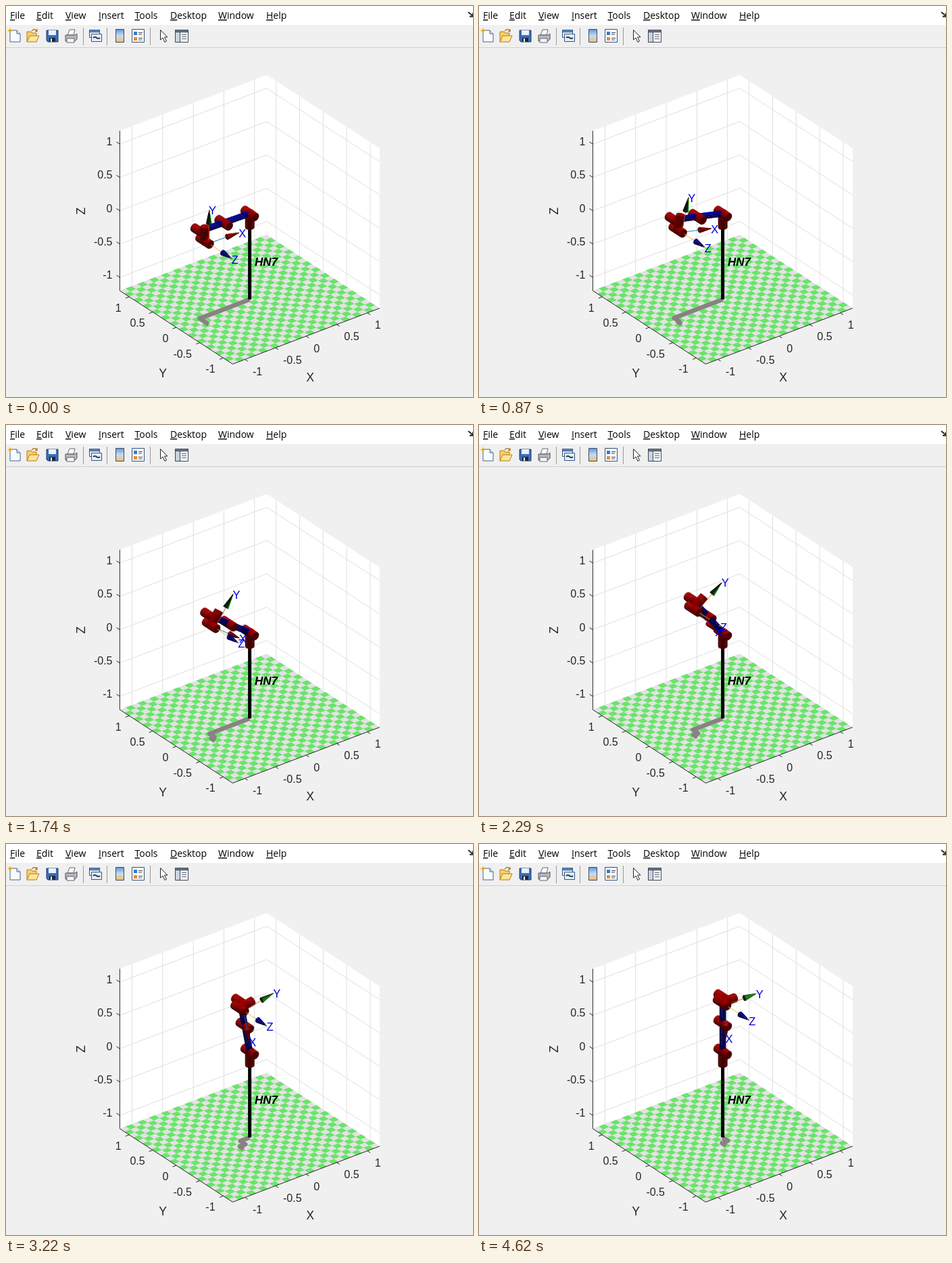
An HTML page with a canvas for the animation above (5350 ms loop, 691 by 578 pixels).

```html
<!DOCTYPE html>
<html lang="en">
<head>
<meta charset="utf-8">
<title>Robot arm plot</title>
<style>
html, body { margin: 0; width: 100%; height: 100%; overflow: hidden; background: #f0f0f0; }
svg, canvas { position: absolute; left: 0; top: 0; width: 691px; height: 578px; }
text { font-family: "Liberation Sans", Arial, sans-serif; fill: #262626; }
.menu text { font: 14px "Open Sans", "Noto Sans", sans-serif; fill: #000; }
.menu tspan { text-decoration: underline; }
.tick text { font-size: 16px; }
.axis text { font-size: 17.6px; text-anchor: middle; }
.tool text { font-size: 16.5px; fill: #0000e0; }
</style>
</head>
<body>
<svg id="back" viewBox="0 0 691 578">
  <rect width="691" height="578" fill="#f0f0f0"/>
  <rect width="691" height="28" fill="#fff"/>
  <path d="M0 61.5H691" stroke="#cfcfcf"/>
  <path d="M684 9l6 5M691 10v5.500h-5" fill="none" stroke="#222" stroke-width="1.800"/>
  <g class="menu" id="menu"></g>
  <path d="M114.500 32V58M149.500 32V58M213.500 32V58" stroke="#9a9a9a"/>
  <g stroke-linejoin="round">
    <path d="M6 36H16L21 41V53H6Z" fill="#f8fbff" stroke="#46648f"/>
    <path d="M16 36V41H21" fill="#d5e2f3" stroke="#46648f"/>
    <path d="M6 32.500l1.300 2.700 2.700 1.300-2.700 1.300L6 40.500l-1.300-2.700L2 36.500l2.700-1.300Z" fill="#f5a800"/>
    <path d="M31 53V38H37L39 40H45V44" fill="#f6d06c" stroke="#b47a17"/>
    <path d="M31 53L35 44H49L45 53Z" fill="#ffe59a" stroke="#b47a17"/>
    <path d="M38 37Q42 32 46 37M46 34V37.500H43" fill="none" stroke="#b47a17" stroke-width="1.300"/>
    <path d="M60 36H77V53H62L60 51Z" fill="#3c6db5" stroke="#1e3c6e"/>
    <path d="M63 36H74V43H63Z" fill="#eaf2ff"/>
    <path d="M64 47H73V53H64Z" fill="#1c2740"/>
    <path d="M66 48H68V53H66Z" fill="#fff"/>
    <path d="M91 43L94 35H102L100 43Z" fill="#fff" stroke="#667"/>
    <path d="M88 43H102L105 41V49L102 52H88Z" fill="#b5b8bd" stroke="#50545c"/>
    <path d="M90 48H101V54H90Z" fill="#f7f7f7" stroke="#667"/>
    <path d="M123.500 35.500H138.500V46.500H123.500Z" fill="#e5eefb" stroke="#33557f"/>
    <path d="M123.500 35.500H138.500V38.500H123.500Z" fill="#5c8fd0" stroke="#33557f"/>
    <path d="M126.500 41.500H141.500V52.500H126.500Z" fill="#e5eefb" stroke="#33557f"/>
    <path d="M129 47a3 2.300 0 0 1 5 0a3 2.300 0 0 0 5 0" fill="none" stroke="#344" stroke-width="2"/>
    <linearGradient id="bar" x1="0" y1="0" x2="0" y2="1">
      <stop stop-color="#5d98e0"/><stop offset=".5" stop-color="#c6dcee"/><stop offset="1" stop-color="#f1bd69"/>
    </linearGradient>
    <path d="M162.500 34.500H174.500V53.500H162.500Z" fill="url(#bar)" stroke="#3c4b66"/>
    <path d="M186.500 34.500H204.500V53.500H186.500Z" fill="#f8fbff" stroke="#33557f"/>
    <path d="M189 38H194V43H189Z" fill="#3e78c6"/>
    <path d="M189 46H194V51H189Z" fill="#e98d2d"/>
    <path d="M196 39.500H202M196 42H201M196 47.500H202M196 50H201" stroke="#445"/>
    <path d="M228.500 35.500V50L232 47L235 53.500L237.500 52L234.500 46H239Z" fill="#fff" stroke="#222"/>
    <path d="M250.500 35.500H269.500V53.500H250.500Z" fill="#fafafa" stroke="#3c4655"/>
    <path d="M250.500 35.500H269.500V38.500H250.500Z" fill="#6d7b90" stroke="#3c4655"/>
    <path d="M251 39H257V53H251Z" fill="#c9d3e2"/>
    <path d="M257.500 39V53" stroke="#3c4655"/>
    <path d="M260 42.500H267M260 45.500H267M260 48.500H267" stroke="#5a6270"/>
  </g>
  <g id="box"></g>
  <g class="tick" id="ticks"></g>
  <g class="axis">
    <text x="450" y="555">X</text>
    <text x="232" y="549">Y</text>
    <text transform="translate(117 303) rotate(-90)">Z</text>
  </g>
  <text x="368" y="384" font-size="17" font-weight="bold" font-style="italic" style="fill:#000">HN7</text>
</svg>
<canvas id="arm" width="691" height="578"></canvas>
<svg class="tool" viewBox="0 0 691 578">
  <text id="tx">X</text><text id="ty">Y</text><text id="tz">Z</text>
</svg>
<script>
const $ = id => document.getElementById(id);
const W = 1.2;
const project = ([x, y, z]) => [360.6 + 90.6 * x - 69.6 * y, 315.6 - 34.4 * x - 45.2 * y - 98.5 * z];
const pts = list => list.map(p => project(p).map(v => v.toFixed(2)).join()).join(" ");
const poly = (list, fill) => `<polygon points="${pts(list)}" fill="${fill}"/>`;
const line = (list, color) => `<polyline points="${pts(list)}" fill="none" stroke="${color}"/>`;

// Menu
$("menu").innerHTML = [["File", 6], ["Edit", 45], ["View", 88], ["Insert", 137], ["Tools", 190.5],
  ["Desktop", 243], ["Window", 314], ["Help", 385]]
  .map(([s, x]) => `<text x="${x}" y="19"><tspan>${s[0]}</tspan>${s.slice(1)}</text>`).join("");

// Walls, floor and grid
function buildBox() {
  let s = poly([[-W, W, -W], [-W, W, W], [W, W, W], [W, W, -W]], "#fff")
    + poly([[W, W, -W], [W, W, W], [W, -W, W], [W, -W, -W]], "#fff");
  const marks = [-1, -0.5, 0, 0.5, 1];
  for (const m of marks) {
    s += line([[m, W, -W], [m, W, W]], "#dfdfdf");
    s += line([[W, m, -W], [W, m, W]], "#dfdfdf");
    s += line([[-W, W, m], [W, W, m], [W, -W, m]], "#dfdfdf");
  }
  s += poly([[-W, -W, -W], [W, -W, -W], [W, W, -W], [-W, W, -W]], "#e2e2e2");
  // An odd number of tiles leaves every corner pale
  const tiles = 25, t = 2 * W / tiles;
  for (let i = 0; i < tiles; i++) {
    for (let j = (i + 1) % 2; j < tiles; j += 2) {
      const x = -W + i * t, y = -W + j * t;
      s += poly([[x, y, -W], [x + t, y, -W], [x + t, y + t, -W], [x, y + t, -W]], "#6ae46a");
    }
  }
  s += line([[-W, W, W], [-W, W, -W], [-W, -W, -W], [W, -W, -W]], "#262626");

  let labels = "";
  const text = (x, y, m, anchor) =>
    labels += `<text x="${x}" y="${y}" text-anchor="${anchor}">${m}</text>`;
  for (const m of marks) {
    s += line([[m, -W, -W], [m, -W - 0.06, -W]], "#262626");
    s += line([[-W, m, -W], [-W - 0.06, m, -W]], "#262626");
    s += line([[-W, W, m], [-W, W + 0.07, m]], "#262626");
    const neg = m < 0 ? 3 : 0, wide = m % 1 ? 6.5 : 0;
    const [xx, xy] = project([m, -W, -W]), [yx, yy] = project([-W, m, -W]);
    text(xx + 15.5 + neg + wide, xy + 23.5, m, "middle");
    text(yx - 16 - neg - wide, yy + 22, m, "middle");
    text(157.5, project([-W, W, m])[1] + 2, m, "end");
  }
  $("box").innerHTML = s;
  $("ticks").innerHTML = labels;
}
buildBox();

// Small vector helpers
const add = (a, b, k = 1) => a.map((v, i) => v + b[i] * k);
const dot = (a, b) => a[0] * b[0] + a[1] * b[1] + a[2] * b[2];
const cross = (a, b) => [a[1] * b[2] - a[2] * b[1], a[2] * b[0] - a[0] * b[2], a[0] * b[1] - a[1] * b[0]];
const unit = a => add([0, 0, 0], a, 1 / Math.hypot(...a));
const EYE = unit([-0.527, -0.687, 0.499]);
const TOP = [0, 0, 1], SIDE = unit([1, -0.25, 0.15]);
const RED = [255, 0, 0], BLUE = [0, 0, 255], GREEN = [40, 255, 40];

const ctx = $("arm").getContext("2d");
let faces = [];

function face(list, normal, rgb, light, ambient, diffuse) {
  if (dot(normal, EYE) <= 0) return;
  const k = ambient + diffuse * Math.max(0, dot(normal, light));
  const mid = list.reduce((m, p) => add(m, p, 1 / list.length), [0, 0, 0]);
  faces.push({ list, depth: dot(mid, EYE), fill: `rgb(${rgb.map(v => Math.round(v * k))})` });
}

// Cylinder or cone between a and b, cut into rings for depth sorting
function tube(a, b, r0, r1, rgb, rings, light = TOP, ambient = 0.28, diffuse = 0.36) {
  const d = add(b, a, -1), w = unit(d), len = Math.hypot(...d), n = 20;
  const u = unit(cross(w, Math.abs(w[1]) > 0.9 ? [1, 0, 0] : [0, 1, 0])), v = cross(w, u);
  const radial = t => add(add([0, 0, 0], u, Math.cos(t)), v, Math.sin(t));
  const at = (f, t) => add(add(a, d, f), radial(t), r0 + (r1 - r0) * f);
  const step = 2 * Math.PI / n, round = [...Array(n).keys()].map(i => i * step);
  for (const t of round) {
    const normal = unit(add(radial(t + step / 2), w, (r0 - r1) / len));
    for (let i = 0; i < rings; i++) {
      const f = i / rings, g = (i + 1) / rings;
      face([at(f, t), at(f, t + step), at(g, t + step), at(g, t)], normal, rgb, light, ambient, diffuse);
    }
  }
  face(round.map(t => at(0, t)), add([0, 0, 0], w, -1), rgb, light, ambient, diffuse);
  if (r1) face(round.map(t => at(1, t)), w, rgb, light, ambient, diffuse);
}

const joint = (p, axis) => tube(add(p, axis, -0.12), add(p, axis, 0.12), 0.057, 0.057, RED, 8);
const link = (a, b) => tube(a, b, 0.038, 0.038, BLUE, 12);

function arrow(p, dir, color, rgb, light, ambient, diffuse) {
  for (let i = 0; i < 10; i++) {
    const list = [add(p, dir, i * 0.05), add(p, dir, (i + 1) * 0.05)];
    faces.push({ list, depth: dot(add(p, dir, i * 0.05 + 0.025), EYE), stroke: color });
  }
  tube(add(p, dir, 0.3), add(p, dir, 0.49), 0.036, 0, rgb, 3, light, ambient, diffuse);
}

function trace(list) {
  ctx.beginPath();
  list.forEach(p => ctx.lineTo(...project(p)));
}

function stroke(list, color, width) {
  trace(list);
  ctx.strokeStyle = color;
  ctx.lineWidth = width;
  ctx.stroke();
}

function place(id, p, dir) {
  const [x, y] = project(add(p, dir, 0.5));
  $(id).setAttribute("x", x - 0.8);
  $(id).setAttribute("y", y + 7);
}

function draw(angle) {
  const c = Math.cos(angle), s = Math.sin(angle);
  const turn = ([x, y, z]) => [x * c + z * s, y, z * c - x * s];
  const pose = p => add(turn(p), [0, 0, 0.0892]);
  const base = [0, 0, 0], out = [0, -1, 0];
  const ax = turn([1, 0, 0]), up = turn([0, 0, 1]);
  const [shoulder, elbow, w1, w2, w3, tip] = [[0, 0, 0], [-0.425, 0, 0], [-0.81725, 0, 0],
    [-0.81725, -0.10915, 0], [-0.81725, -0.10915, -0.09465], [-0.81725, -0.19145, -0.09465]].map(pose);

  ctx.clearRect(0, 0, 691, 578);
  ctx.lineJoin = "round";
  stroke([base, shoulder, elbow, w1, w2, w3, tip].map(p => [p[0], p[1], -W]), "#8b8084", 6.5);
  stroke([[0, 0, -W], base], "#000", 5);

  faces = [];
  joint(base, TOP);
  joint(shoulder, out);
  joint(elbow, out);
  joint(w1, out);
  joint(w2, up);
  joint(w3, out);
  link(shoulder, elbow);
  link(elbow, w1);
  link(w1, w2);
  arrow(tip, ax, "#0072bd", RED, TOP, 0.3, 0.35);
  arrow(tip, up, "#d95319", GREEN, SIDE, 0.08, 0.9);
  arrow(tip, out, "#edb120", BLUE, TOP, 0.28, 0.2);

  faces.sort((a, b) => a.depth - b.depth);
  for (const f of faces) {
    if (f.stroke) { stroke(f.list, f.stroke, 0.9); continue; }
    trace(f.list);
    ctx.closePath();
    ctx.fillStyle = ctx.strokeStyle = f.fill;
    ctx.lineWidth = 0.5;
    ctx.fill();
    ctx.stroke();
  }
  place("tx", tip, ax);
  place("ty", tip, up);
  place("tz", tip, out);
}

// Times in ms at which the arm takes its next step
const STEPS = [0, 130, 200, 330, 400];
for (const t of [540, 1210, 2090, 2690, 3370, 4030]) {
  for (const d of [0, 130, 200, 330, 400, t === 4030 ? 520 : 530]) STEPS.push(t + d);
  if (t === 1210) STEPS.push(1870, 1940);
}
STEPS.push(4620);
const LOOP = 5350, FIRST = 6, LAST = 49;

// Quintic easing from flat to upright
function angleAt(k) {
  const x = k / LAST;
  return Math.PI / 2 * x ** 3 * (10 - 15 * x + 6 * x * x);
}

const start = performance.now();
let shown = -1;
function tick() {
  const t = (performance.now() - start) % LOOP;
  const i = STEPS.filter(s => s <= t).length - 1;
  if (i !== shown) draw(angleAt(FIRST + i));
  shown = i;
  requestAnimationFrame(tick);
}
tick();
</script>
</body>
</html>
```
